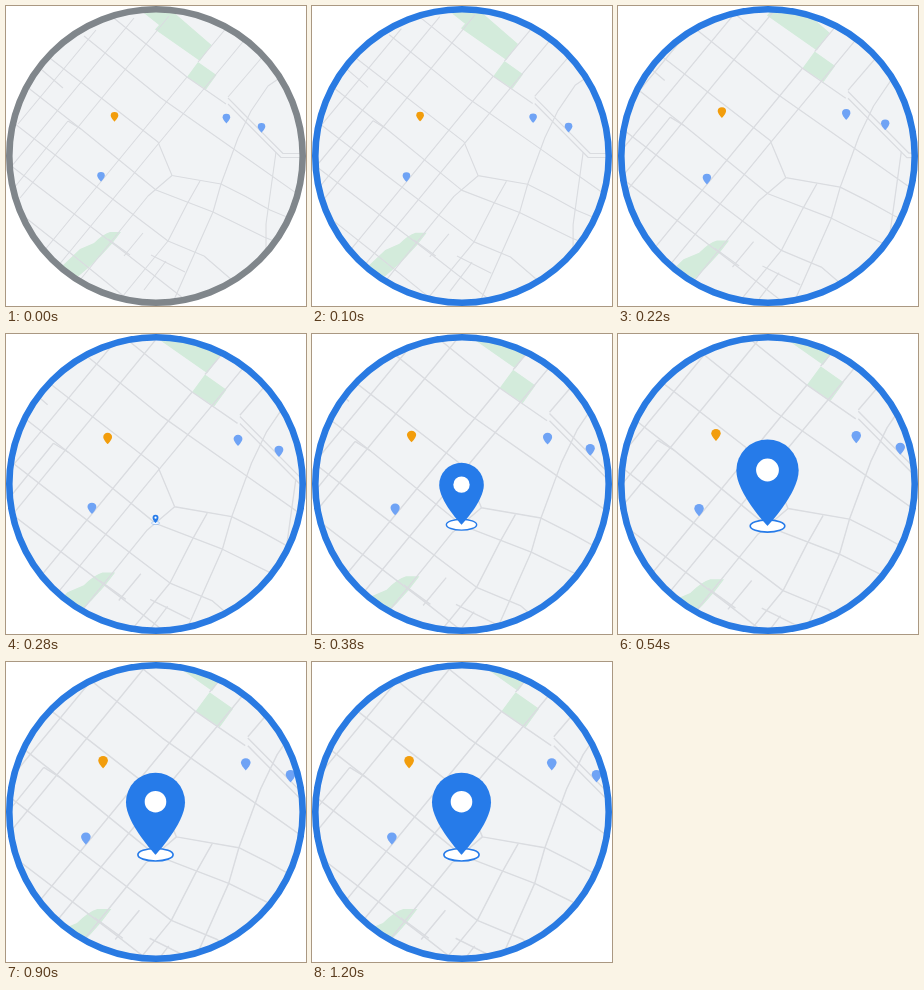
Animation of 300 by 300 pixels, one loop 1.82 s. Source, as an HTML page:

```html
<!DOCTYPE html>
<html lang="en">
<head>
<meta charset="utf-8">
<title>Map pin</title>
<style>
html, body { margin: 0; width: 100%; height: 100%; overflow: hidden; background: #fff; }
svg { display: block; width: 100vw; height: 100vh; }
.roads { fill: none; stroke: #dadce0; stroke-width: 1.15; stroke-linejoin: round; }
.park { fill: #d3ebdb; }
</style>
</head>
<body>
<svg viewBox="0 0 300 300">
  <defs>
    <clipPath id="disc"><circle cx="150" cy="150" r="147"/></clipPath>
    <path id="drop" d="M0 0C0 0-29.5-31-29.5-52.5A29.5 29.5 0 0 1 29.5-52.5C29.5-31 0 0 0 0Z"/>
  </defs>
  <g clip-path="url(#disc)">
    <rect width="300" height="300" fill="#f1f3f5"/>
    <g id="map">
      <path class="park" d="M134 4L165 4L205.500 39L194 55L149 23.500L153 19Z
        M192 56L210.500 69L200 83.500L181 71Z
        M115 226L104 226Q97 228 88 237L74 243L54 262L68 274Q98 250 115 226Z"/>
      <g class="roads">
        <path d="M104 9L181 71L220 98"/>
        <path d="M78 30L155 92L222 139L300 194"/>
        <path d="M36 46L152 136L166 169.500L215 178Q240 190 264 204L300 219"/>
        <path d="M16 77L75 123L150 184L207 206L258 231L290 244"/>
        <path d="M0 111L75 169L162 235L198 250L234 281"/>
        <path d="M0 156L118 246L182 296"/>
        <path d="M20 212L68 250L120 292"/>
        <path d="M36 64L57 82M90 24L12 118"/>
        <path d="M128 12L0 167M62 115L8 182M62 115L75 123"/>
        <path d="M163 10L14 192"/>
        <path d="M181 71L24 262M192 56L232 8"/>
        <path d="M250 20L153 137L52 260"/>
        <path d="M166 169.500L142 190L70 279"/>
        <path d="M222 91L264 42"/>
        <path d="M278 69L262 80L245 105L232 132L215 178L207 206L167 296"/>
        <path d="M222 92L277 147.500L300 147.500M222 98L275 151.500L300 151.500"/>
        <path d="M270 146L265 182L260 218L260 255"/>
        <path d="M194 175L181 198L162 235L112 296"/>
        <path d="M137 227L118 250M102 233L124 249M160 255L138 284M145 249L179 266"/>
      </g>
      <g id="marks"></g>
      <g transform="translate(149.600 183.500)">
        <ellipse id="base" rx="13.800" ry="4.900" fill="#fff" stroke="#267be9" stroke-width="1.300"/>
        <g id="pin">
          <use href="#drop" fill="#267be9"/>
          <circle cy="-53" r="10.800" fill="#fff"/>
        </g>
      </g>
    </g>
  </g>
  <circle id="ring" cx="150" cy="150" r="146.700" fill="none" stroke-width="6.600"/>
</svg>
<script>
const LOOP = 1820, ZOOM = 0.275, PIN = 1 / (1 + ZOOM);
const GREY = [128, 134, 139], BLUE = [41, 122, 226];
const $ = id => document.getElementById(id);
const map = $('map'), pin = $('pin'), base = $('base'), ring = $('ring');

const mark = (x, y, fill) =>
  `<use href="#drop" fill="${fill}" transform="translate(${x} ${y + 5.4}) scale(.128 .117)"/>`;
$('marks').innerHTML = mark(108.5, 110.3, '#f29d0c') +
  [[220.4, 112], [255.5, 121.3], [95, 170.2]].map(p => mark(...p, '#6fa3f5')).join('');

const clamp = v => Math.min(1, Math.max(0, v));
const span = (t, from, to) => clamp((t - from) / (to - from));

// Eases with control points (x1, 0) and (x2, 1)
function ease(x, x1, x2) {
  let lo = 0, hi = 1;
  for (let i = 0; i < 24; i++) {
    const s = (lo + hi) / 2, r = 1 - s;
    if (3 * x1 * r * r * s + 3 * x2 * r * s * s + s * s * s < x) lo = s;
    else hi = s;
  }
  return x >= 1 ? 1 : lo * lo * (3 - 2 * lo);
}

function draw(t) {
  const zoom = 1 + ZOOM * ease(span(t, 20, 880), 0.34, 0.03);
  map.setAttribute('transform', `translate(150 150) scale(${zoom}) translate(-150 -150)`);

  const grow = ease(span(t, 230, 515), 0.36, 0.35);
  const settle = ease(span(t, 520, 820), 0.4, 0.4);
  pin.setAttribute('transform', `scale(${PIN * grow * (1.075 - 0.075 * settle)})`);
  base.setAttribute('transform', `scale(${ease(span(t, 230, 470), 0.3, 0.2)})`);
  const show = t > 230 ? 'visible' : 'hidden';
  pin.setAttribute('visibility', show);
  base.setAttribute('visibility', show);

  const k = span(t, 10, 100);
  ring.setAttribute('stroke',
    `rgb(${GREY.map((g, i) => Math.round(g + (BLUE[i] - g) * k))})`);
}

const start = performance.now();
function tick() {
  draw((performance.now() - start) % LOOP);
  requestAnimationFrame(tick);
}
tick();
</script>
</body>
</html>
```
